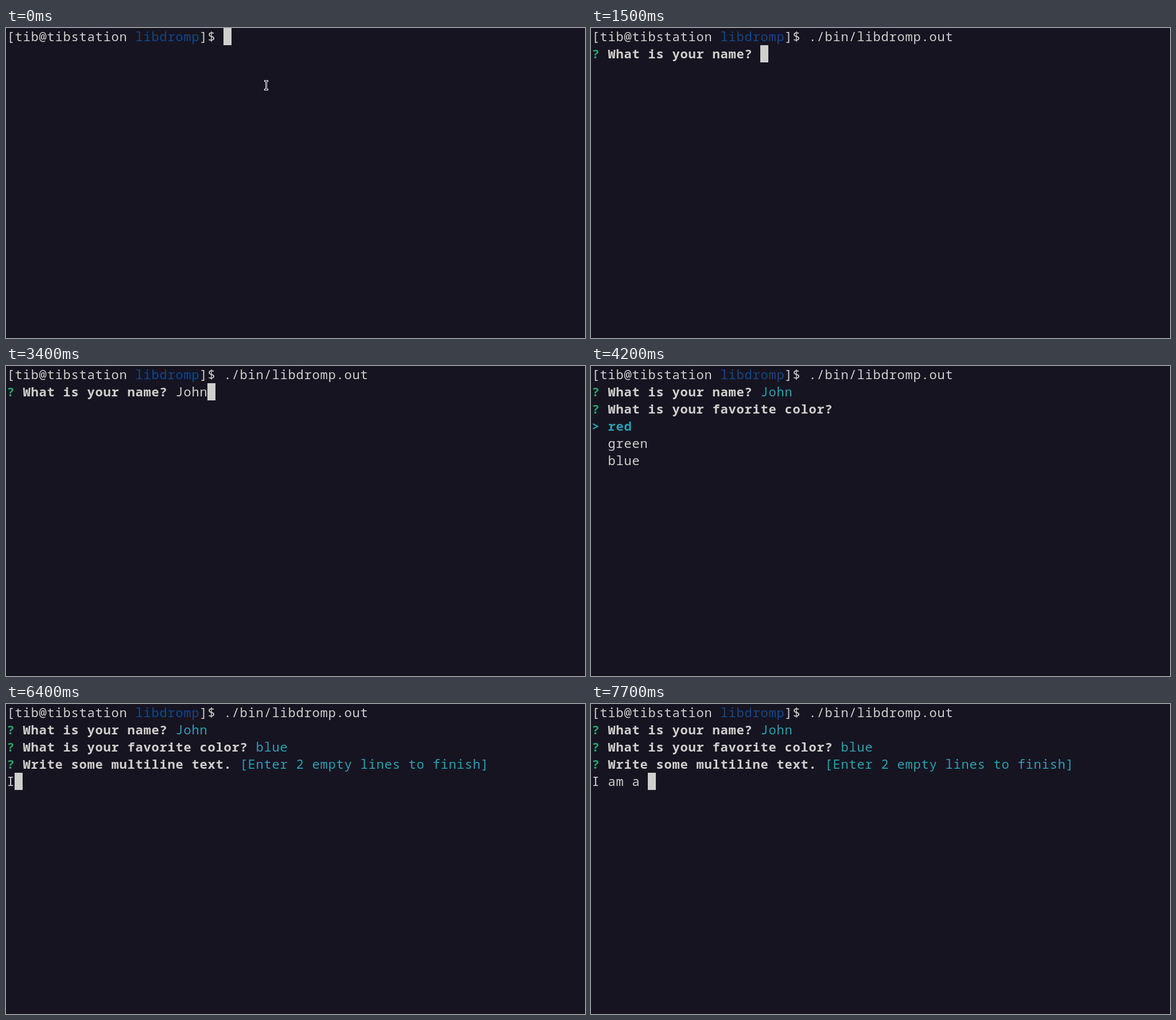
Write an HTML page with a canvas that moves like this. It is 1009 by 541 pixels and loops after 8 s.

```html
<!DOCTYPE html>
<html lang="en">
<head>
<meta charset="utf-8">
<title>Terminal prompts</title>
<style>
  html, body { margin: 0; width: 100%; height: 100%; overflow: hidden; background: #171421; }
  canvas { display: block; }
</style>
</head>
<body>
<canvas id="screen" width="1009" height="541"></canvas>
<script>
const ctx = document.getElementById('screen').getContext('2d');
const LOOP = 8000;
const LEFT = 1, CELL = 14, ROW = 30, BASELINE = 23;
const BG = '#171421', FG = '#d0cfcc', BLUE = '#12488b', GREEN = '#26a269', CYAN = '#2aa1b3';
const COMMAND = './bin/libdromp.out';

// Moments at which each further character appears.
const NAME_KEYS = [2600, 3000, 3200, 3400];
const TEXT_KEYS = [6400, 6600, 7000, 7200, 7300, 7500, 7700];
// Intervals during which the block cursor is blinked off.
const BLINKS = [[400, 600], [2100, 2500], [4200, 4500], [5800, 6000]];

const typed = (text, keys, t) => text.slice(0, keys.filter(k => t >= k).length);

// Writes text on the character grid and returns the next free column.
function write(row, col, text, color = FG, bold = false) {
  ctx.font = `${bold ? 'bold ' : ''}22px "Noto Sans Mono", monospace`;
  ctx.fillStyle = color;
  for (const ch of text) {
    ctx.fillText(ch, LEFT + (col + 0.5) * CELL, row * ROW + BASELINE);
    col++;
  }
  return col;
}

function question(row, text) {
  write(row, 0, '?', GREEN, true);
  return write(row, 2, text, FG, true) + 1;
}

function drawCursor(row, col) {
  ctx.fillStyle = FG;
  ctx.fillRect(LEFT + col * CELL, row * ROW, CELL, ROW);
}

function drawPointer(x, y) {
  const beam = (color, grow) => {
    ctx.fillStyle = color;
    const bar = (dx, dy, w, h) =>
      ctx.fillRect(x + dx - grow, y + dy - grow, w + 2 * grow, h + 2 * grow);
    bar(-2, -8, 5, 1);
    bar(0, -8, 1, 16);
    bar(-2, 7, 5, 1);
  };
  beam('#fff', 1);
  beam('#000', 0);
}

function drawChoices(t) {
  const selected = t < 4600 ? 0 : t < 4800 ? 1 : 2;
  ['red', 'green', 'blue'].forEach((name, i) => {
    const active = i === selected;
    if (active) write(3 + i, 0, '>', CYAN, true);
    write(3 + i, 2, name, active ? CYAN : FG, active);
  });
}

// Draws the session at time t and returns the cursor's cell.
function drawSession(t) {
  let col = write(0, 0, '[tib@tibstation ');
  col = write(0, col, 'libdromp', BLUE);
  col = write(0, col, ']$ ');
  col = write(0, col, t < 600 ? '' : t < 1000 ? 'clear' : COMMAND);
  if (t < 1500) return [0, col];

  col = question(1, 'What is your name?');
  col = write(1, col, typed('John', NAME_KEYS, t), t < 3700 ? FG : CYAN);
  if (t < 3700) return [1, col];

  col = question(2, 'What is your favorite color?');
  if (t < 5200) {
    drawChoices(t);
    return [6, 0];
  }
  write(2, col, 'blue', CYAN);

  col = question(3, 'Write some multiline text.');
  write(3, col, '[Enter 2 empty lines to finish]', CYAN);
  return [4, write(4, 0, typed('I am a ', TEXT_KEYS, t))];
}

function render(now) {
  const t = now % LOOP;
  ctx.fillStyle = BG;
  ctx.fillRect(0, 0, 1009, 541);
  ctx.fillStyle = '#14111d';
  ctx.fillRect(0, 539, 1009, 2);
  ctx.textAlign = 'center';
  const cell = drawSession(t);
  if (!BLINKS.some(([off, on]) => t >= off && t < on)) drawCursor(...cell);
  if (t < 600) drawPointer(453, 100);
}

let start;
function tick(now) {
  start ??= now;
  render(now - start);
  requestAnimationFrame(tick);
}
render(0);
requestAnimationFrame(tick);
</script>
</body>
</html>
```
